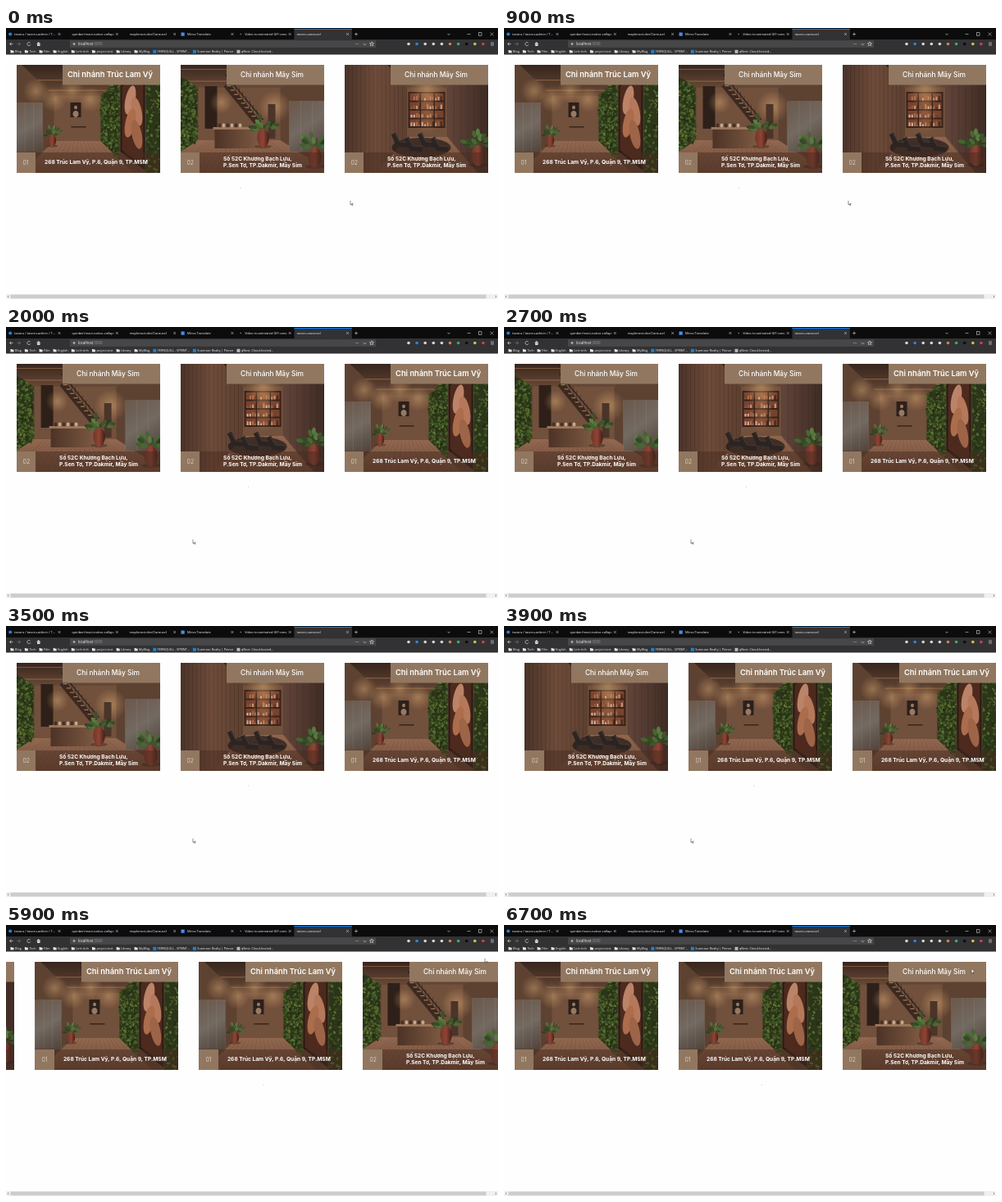
Write an HTML page with a canvas that moves like this. It is 600x331 px and loops after 6.8 s.

```html
<!DOCTYPE html>
<html lang="vi">
<head>
<meta charset="utf-8">
<title>Carousel</title>
<style>
html, body { margin: 0; width: 100%; height: 100%; overflow: hidden; background: #fff; }
canvas { display: block; width: 600px; height: 331px; }
</style>
</head>
<body>
<canvas id="stage"></canvas>
<script>
const W = 600, H = 331, LOOP = 6800, STEP = 100;
const CARD_W = 175, CARD_H = 131.5, PITCH = 200, LEFT = 12.5, TOP = 45;
const FIRST_SLIDE = 1512, SLIDE_EVERY = 2044, SLIDE_MS = 500, SLIDES = 3;
const CARD_FONT = 'Inter, "Open Sans", sans-serif';
const UI_FONT = '"Open Sans", "Noto Sans", sans-serif';
const LIGHT = '#d6d6d8';
const dpr = Math.max(1, window.devicePixelRatio || 1);

function makeCanvas(w, h, scale, el = document.createElement('canvas')) {
  el.width = Math.round(w * scale);
  el.height = Math.round(h * scale);
  const c = el.getContext('2d');
  c.scale(scale, scale);
  return c;
}

function random(seed) {
  return () => (seed = (seed * 16807) % 2147483647) / 2147483647;
}

const mix = (a, b, u) => a + (b - a) * u;

function rect(c, x, y, w, h, fill) {
  c.fillStyle = fill;
  c.fillRect(x, y, w, h);
}

function trace(c, p) {
  c.beginPath();
  for (let i = 0; i < p.length; i += 2) c.lineTo(p[i], p[i + 1]);
}

function poly(c, fill, ...p) {
  trace(c, p);
  c.fillStyle = fill;
  c.fill();
}

function line(c, color, width, ...p) {
  trace(c, p);
  c.strokeStyle = color;
  c.lineWidth = width;
  c.stroke();
}

function oval(c, x, y, rx, ry, fill, turn = 0) {
  c.beginPath();
  c.ellipse(x, y, rx, ry, turn, 0, 7);
  c.fillStyle = fill;
  c.fill();
}

function shade(c, x0, y0, x1, y1, ...colors) {
  const g = c.createLinearGradient(x0, y0, x1, y1);
  colors.forEach((col, i) => g.addColorStop(i / (colors.length - 1), col));
  return g;
}

function glow(c, x, y, r, alpha) {
  const g = c.createRadialGradient(x, y, 0, x, y, r);
  g.addColorStop(0, `rgba(255,205,140,${alpha})`);
  g.addColorStop(1, 'rgba(255,190,120,0)');
  rect(c, x - r, y - r, 2 * r, 2 * r, g);
}

function text(c, str, x, y, size, color, weight = 400, font = UI_FONT) {
  c.font = `${weight} ${size}px ${font}`;
  c.fillStyle = color;
  c.fillText(str, x, y);
}

// A room in one-point perspective, set by its back wall.
class Room {
  constructor(c, x0, y0, x1, y1) {
    Object.assign(this, { c, x0, y0, x1, y1, vx: (x0 + x1) / 2, vy: (y0 + y1) / 2 });
    rect(c, 0, 0, CARD_W, CARD_H, '#5d4232');
    rect(c, x0, y0, x1 - x0, y1 - y0, '#71503c');
    this.paintPlane(y0, -40, shade(c, 0, 0, 0, y0, '#38261d', '#684937'));
    this.paintPlane(y1, 180, shade(c, 0, y1, 0, CARD_H, '#936850', '#6d4b39'));
    for (let i = -9; i <= 9; i++) {
      line(c, 'rgba(60,34,22,.25)', .5, this.vx + i * 4, y1, ...this.project(this.vx + i * 4, y1, 4));
    }
    for (const k of [1.25, 1.7]) {
      const [l, y] = this.project(x0, y0, k), [r] = this.project(x1, y0, k);
      line(c, 'rgba(190,135,90,.55)', .9, l, y, r, y);
    }
  }
  project(x, y, k) {
    return [this.vx + (x - this.vx) * k, this.vy + (y - this.vy) * k];
  }
  paintPlane(y, edge, fill) {
    const k = (edge - this.vy) / (y - this.vy);
    poly(this.c, fill, this.x0, y, this.x1, y, ...this.project(this.x1, y, k), ...this.project(this.x0, y, k));
  }
  // Point on a side wall; v runs from ceiling (0) to floor (1).
  wall(x, v) {
    const k = Math.abs(x - this.vx) / (this.x1 - this.vx);
    return [x, this.vy + mix(this.y0 - this.vy, this.y1 - this.vy, v) * k];
  }
  panel(xa, xb, v0, v1, fill) {
    poly(this.c, fill, ...this.wall(xa, v0), ...this.wall(xb, v0), ...this.wall(xb, v1), ...this.wall(xa, v1));
  }
  planks(xa, xb, n) {
    for (let i = 0; i <= n; i++) {
      const x = mix(xa, xb, i / n);
      line(this.c, 'rgba(42,25,18,.32)', .6, ...this.wall(x, 0), ...this.wall(x, 1));
    }
  }
  hedge(xa, xb, seed) {
    const rnd = random(seed), leaves = Math.abs(xb - xa) * 14;
    this.panel(xa, xb, 0, 1, '#2b3519');
    for (let i = 0; i < leaves; i++) {
      const [x, y] = this.wall(mix(xa, xb, rnd()), rnd());
      oval(this.c, x, y, .7 + rnd() * 1.7, .6 + rnd(), `hsl(${mix(70, 95, rnd())},40%,${mix(12, 34, rnd())}%)`, rnd() * 3);
    }
  }
}

function plant(c, x, y, r, seed) {
  const rnd = random(seed);
  for (let i = 0; i < 18; i++) {
    const a = Math.PI * (1 + rnd()), d = r * mix(.35, 1, rnd());
    const px = x + Math.cos(a) * d, py = y + Math.sin(a) * d;
    line(c, '#3c5526', .5, x, y, px, py);
    oval(c, px, py, r * .24, r * .13, `hsl(95,32%,${mix(18, 38, rnd())}%)`, a);
  }
}

function pottedPlant(c, x, y, r, seed) {
  const w = r * .85, h = r * 1.35;
  plant(c, x, y + 1, r, seed);
  oval(c, x, y + h * .95, w * .7, h * .1, 'rgba(30,15,10,.35)');
  oval(c, x, y + h / 2, w / 2, h / 2, shade(c, x - w / 2, 0, x + w / 2, 0, '#713529', '#8f4535', '#431d17'));
}

function glass(c, x, y, w, h) {
  rect(c, x, y, w, h, shade(c, x, y, x + w, y + h, '#6b584b', '#736a62', '#51443b'));
  for (let i = 0; i <= 3; i++) line(c, 'rgba(205,195,185,.22)', .5, x + w * i / 3, y, x + w * i / 3, y + h);
}

function corridor(c) {
  const room = new Room(c, 46, 38, 103, 93);
  glass(c, 0, 46, 32, 60);
  for (let i = 0; i < 4; i++) glow(c, 24 + i * 22, 32 + i % 2 * 10, 16, .35);
  rect(c, 66, 46, 13, 18, '#2b201b');
  oval(c, 72.5, 52, 2, 2.3, '#987963');
  oval(c, 72.5, 60, 3.5, 4, '#987963');
  rect(c, 67, 75, 18, 1.6, '#3b271d');
  pottedPlant(c, 44, 85, 11, 12);
  room.hedge(103, 126, 31);
  room.panel(127, 157, .1, .9, '#271a15');
  room.panel(129, 155, .13, .87, '#4d2a1d');
  for (let i = 0; i < 4; i++) {
    oval(c, 139 + i % 2 * 8, 43 + i * 14, 6, 18, `hsl(20,38%,${mix(57, 45, i / 3)}%)`, i % 2 ? -.2 : .2);
  }
  room.hedge(158, 175, 57);
}

function lobby(c) {
  const room = new Room(c, 22, 28, 122, 92);
  room.hedge(0, 21, 83);
  rect(c, 30, 26, 15, 52, '#2e2019');
  glow(c, 50, 46, 14, .35);
  glow(c, 115, 51, 20, .4);
  line(c, '#3c291f', 8, 56, 24, 100, 78);
  for (let i = 0; i < 10; i++) {
    const x = 57 + i * 4.3, y = 25 + i * 5.3;
    rect(c, x, y, 5, 1.2, '#a07a5c');
    line(c, '#2c211c', .5, x + 2, y, x + 2, y - 13);
  }
  line(c, '#291e19', 1.2, 55, 12, 101, 67);
  rect(c, 107, 48, 9, 42, '#4b3429');
  glass(c, 133, 44, 42, 62);
  rect(c, 42, 78, 52, 24, shade(c, 42, 0, 94, 0, '#4d3326', '#7b5841'));
  rect(c, 40, 76, 55, 3, '#9a755a');
  for (let i = 0; i < 6; i++) oval(c, 48 + i * 5, 74, 2, 2.5, i % 2 ? '#c4a88e' : '#493025');
  pottedPlant(c, 101, 78, 17, 19);
  pottedPlant(c, 164, 100, 19, 47);
}

function studio(c) {
  const room = new Room(c, 76, 28, 126, 88), rnd = random(71);
  room.panel(0, 76, 0, 1, shade(c, 0, 0, 76, 0, '#4a3328', '#6f4c3b', '#5d4031'));
  room.planks(0, 76, 15);
  room.panel(126, 175, 0, 1, shade(c, 126, 0, 175, 0, '#62453a', '#3f2c25'));
  room.planks(126, 175, 6);
  rect(c, 78, 33, 45, 44, '#38221b');
  for (let row = 0; row < 4; row++) {
    const y = 35 + row * 10.5;
    rect(c, 80, y, 41, 8.5, '#78422e');
    glow(c, 101, y + 3, 16, .14);
    for (let i = 0; i < 12; i++) {
      const h = mix(2, 6, rnd());
      rect(c, 81 + i * 3.3, y + 8.5 - h, 2, h, `hsl(22,40%,${mix(15, 75, rnd())}%)`);
    }
  }
  for (const x of [92, 109]) rect(c, x, 33, 1.5, 44, '#38221b');
  glow(c, 101, 28, 22, .35);
  oval(c, 94, 101, 36, 12, 'rgba(32,25,23,.7)');
  for (let i = 0; i < 4; i++) {
    const x = 60 + i * 16, y = 91 + i % 2 * 5;
    line(c, '#2b2422', 6, x, y - 7, x + 6, y + 6, x + 19, y + 7);
    line(c, '#4a403b', .8, x + 2, y - 7, x + 8, y + 3, x + 20, y + 4);
  }
  pottedPlant(c, 163, 98, 19, 23);
}

const BRANCH_A = {
  draw: corridor, no: '01', title: 'Chi nhánh Trúc Lam Vỹ', size: 9.3, weight: 600, titleX: 62.5,
  lines: ['268 Trúc Lam Vỹ, P.6, Quận 9, TP.MSM'], linesX: 34.5
};
const BRANCH_B = {
  draw: lobby, no: '02', title: 'Chi nhánh Mây Sim', size: 8.4, weight: 500, titleX: 73.5,
  lines: ['Số 52C Khương Bạch Lựu,', 'P.Sen Tơ, TP.Dakmir, Mây Sim'], linesX: 52.5
};
const BRANCH_C = { ...BRANCH_B, draw: studio };
const CARDS = [BRANCH_A, BRANCH_B, BRANCH_C];
const STRIP = [...CARDS, ...CARDS.slice(0, 1), ...CARDS];

for (const card of CARDS) {
  const c = makeCanvas(CARD_W, CARD_H, dpr * 2);
  card.draw(c);
  rect(c, 0, 107, CARD_W, 24.5, 'rgba(72,45,32,.5)');
  rect(c, 56.5, 0, CARD_W, 24.5, '#917760');
  rect(c, 0, 107, 23.5, 24.5, '#917760');
  card.image = c.canvas;
}

function drawCard(c, card, x) {
  if (x > W || x + CARD_W < 0) return;
  c.save();
  c.translate(x, TOP);
  c.drawImage(card.image, 0, 0, CARD_W, CARD_H);
  text(c, card.title, card.titleX, 15.2, card.size, '#fff', card.weight, CARD_FONT);
  text(c, card.no, 8, 121.7, 7, '#eee4db', 300, CARD_FONT);
  const first = 121.4 - 4 * (card.lines.length - 1);
  card.lines.forEach((s, i) => text(c, s, card.linesX, first + i * 8, 6.6, '#fff', 700, CARD_FONT));
  c.restore();
}

const TAB_W = 70.3;
const TABS = [
  'tavoru / tavoru-admin / T…', 'quinber/react-native-collapsi', 'mapleroot-dev/Carousel',
  'Mirvo Translate', 'Video to animated GIF convert', 'tavoru-carousel'
];
const FOLDERS = ['Blog', 'Tech', 'Film', 'English', 'Linh tinh', 'project-test', 'Library', 'MyBlog'];
const LINKS = ['FERNQUILL - SPRINT…', 'Sunmoor Realty | Pinnor', 'qNest: Cloud-hosted…'];
const TOOLS = [LIGHT, '#2889e8', LIGHT, LIGHT, LIGHT, '#c98a4b', '#3fae6a', '#0c0c0d', '#d6c24b', '#d34242'];

function cross(c, x, y, r, color) {
  line(c, color, .6, x - r, y - r, x + r, y + r);
  line(c, color, .6, x + r, y - r, x - r, y + r);
}

function chevron(c, x, y, dx, dy, color = LIGHT) {
  line(c, color, .7, x - dx - dy, y - dy - dx, x, y, x - dx + dy, y - dy + dx);
}

function drawTabs(c) {
  const active = TABS.length - 1;
  rect(c, 0, 0, W, 14, '#0c0c0d');
  rect(c, active * TAB_W, 1, TAB_W, 13, '#323234');
  rect(c, active * TAB_W, 1, TAB_W, 1, '#0a84ff');
  TABS.forEach((label, i) => {
    const edge = i * TAB_W, x = edge + (i === active ? 3 : 10);
    c.save();
    c.beginPath();
    c.rect(x, 2, edge + 61 - x, 11);
    c.clip();
    text(c, label, x, 9.2, 4, '#f4f4f5');
    c.restore();
    cross(c, edge + 65, 7.5, 1.4, LIGHT);
  });
  oval(c, 5.2, 7.5, 2.1, 2.1, '#2a7ce0');
  rect(c, 3 * TAB_W + 2.6, 5.5, 4.2, 4.2, '#4b8cf0');
  oval(c, 4 * TAB_W + 5, 7.5, .7, .7, '#aaa');
  line(c, LIGHT, .6, 425, 7.5, 429, 7.5);
  line(c, LIGHT, .6, 427, 5.5, 427, 9.5);
  chevron(c, 540, 8.4, 0, 1.5);
  line(c, LIGHT, .6, 562.5, 7.5, 566.5, 7.5);
  c.strokeRect(576.5, 5.7, 3.5, 3.5);
  cross(c, 592.5, 7.5, 1.9, LIGHT);
}

function drawToolbar(c) {
  const y = 19.5;
  rect(c, 0, 14, W, 18.5, '#323234');
  line(c, LIGHT, .7, 4.5, y, 8.5, y);
  chevron(c, 4.5, y, -2, 0);
  line(c, '#77777b', .7, 13.5, y, 17.5, y);
  chevron(c, 17.5, y, 2, 0, '#77777b');
  c.beginPath();
  c.arc(28, y, 2.1, .4, 5.6);
  c.strokeStyle = LIGHT;
  c.stroke();
  poly(c, LIGHT, 37, y, 39.7, 17, 42.4, y);
  rect(c, 38, y, 3.5, 2.5, LIGHT);
  rect(c, 78, 15.2, 373, 8.6, '#474749');
  oval(c, 83, y, 1.4, 1.4, '#aaaaae');
  text(c, 'localhost', 88, 21, 4.4, '#f4f4f5');
  text(c, ':3000', 88 + c.measureText('localhost').width, 21, 4.4, '#97979b');
  for (let i = 0; i < 3; i++) {
    oval(c, 426.5 + i * 1.6, y, .45, .45, LIGHT);
    line(c, LIGHT, .6, 591, 17.8 + i * 1.7, 595, 17.8 + i * 1.7);
  }
  chevron(c, 437.5, 20.8, 0, 1.8);
  c.beginPath();
  for (let i = 0; i < 10; i++) {
    const a = i * Math.PI / 5, r = i % 2 ? 1.2 : 2.6;
    c.lineTo(446 + r * Math.sin(a), y - r * Math.cos(a));
  }
  c.closePath();
  c.stroke();
  TOOLS.forEach((color, i) => oval(c, 491 + i * 10.1, y, 1.8, 1.8, color));
}

function drawBookmarks(c) {
  let x = 5.5;
  for (const label of [...FOLDERS, ...LINKS]) {
    if (FOLDERS.includes(label)) {
      rect(c, x, 27, 1.8, 1, '#e6e6e8');
      rect(c, x, 27.6, 4, 2.8, '#e6e6e8');
    } else rect(c, x, 26.8, 4, 4, label === LINKS[2] ? '#b8b8bc' : '#1c83cc');
    text(c, label, x + 5.5, 30.2, 3.8, '#f4f4f5');
    x += 9.6 + c.measureText(label).width;
  }
}

function drawScrollbar(c) {
  rect(c, 0, 325, W, 6, '#f0f0f0');
  rect(c, 5.5, 325.6, 580, 4.8, '#cdcdcd');
  chevron(c, 2, 328, -1.2, 0, '#606060');
  chevron(c, 598, 328, 1.2, 0, '#606060');
}

// CSS "ease": cubic-bezier(.25, .1, .25, 1)
function ease(p) {
  if (p <= 0 || p >= 1) return p <= 0 ? 0 : 1;
  const bez = (a, b, s) => 3 * a * s * (1 - s) ** 2 + 3 * b * s * s * (1 - s) + s ** 3;
  let lo = 0, hi = 1;
  for (let i = 0; i < 24; i++) {
    const m = (lo + hi) / 2;
    if (bez(.25, .25, m) < p) lo = m; else hi = m;
  }
  return bez(.1, 1, lo);
}

const POINTER_MOVES = [
  { from: 1080, to: 2000, x: 228, y: 259.5 },
  { from: 4300, to: 4900, x: 584, y: 41 },
  { from: 6000, to: 6500, x: 570, y: 54 }
];

function pointerAt(t) {
  let x = 420, y = 211;
  for (const m of POINTER_MOVES) {
    const u = Math.min(1, Math.max(0, (t - m.from) / (m.to - m.from)));
    x = mix(x, m.x, u);
    y = mix(y, m.y, u);
  }
  return [x, y];
}

function drawPointer(c, x, y) {
  c.save();
  c.translate(x, y);
  poly(c, '#fff', 0, 0, 0, 5, 1.2, 3.9, 2, 5.8, 2.9, 5.4, 2.1, 3.6, 3.6, 3.5);
  c.strokeStyle = '#222';
  c.lineWidth = .5;
  c.stroke();
  c.restore();
}

const ctx = makeCanvas(W, H, dpr, document.getElementById('stage'));

function render(t) {
  let offset = 0, active = 0;
  for (let i = 0; i < SLIDES; i++) {
    const p = (t - FIRST_SLIDE - i * SLIDE_EVERY) / SLIDE_MS;
    offset += ease(p);
    if (p >= 0) active++;
  }
  rect(ctx, 0, 0, W, H, '#fefefe');
  STRIP.forEach((card, i) => drawCard(ctx, card, LEFT + (i - offset) * PITCH));
  oval(ctx, 286 + active * 9.4, 195, .6, .6, '#b5b5b5');
  drawTabs(ctx);
  drawToolbar(ctx);
  drawBookmarks(ctx);
  drawScrollbar(ctx);
  drawPointer(ctx, ...pointerAt(t));
}

const start = performance.now();
let shown = -1;
function tick() {
  const t = Math.floor(((performance.now() - start) % LOOP) / STEP) * STEP;
  if (t !== shown) render(shown = t);
  requestAnimationFrame(tick);
}
tick();
</script>
</body>
</html>
```
